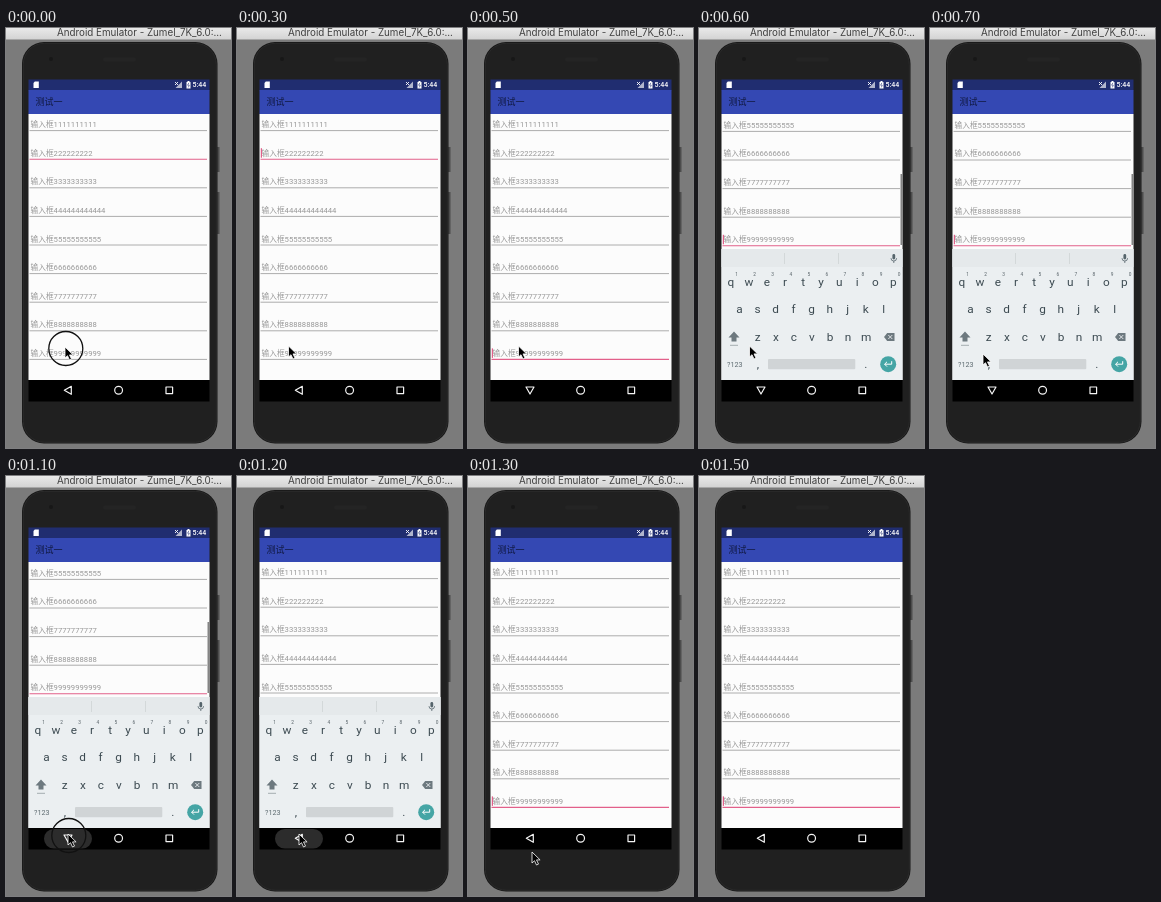
These frames come from a looping animation (225x420 px, 1600 ms). An HTML page:

```html
<!DOCTYPE html>
<html lang="zh">
<head>
<meta charset="utf-8">
<style>
  html, body { margin: 0; width: 100%; height: 100%; overflow: hidden; background: #7b7b7b; }
  svg { display: block; width: 100vw; height: 100vh; font-family: Roboto, "Noto Sans CJK SC", "Noto Sans CJK", sans-serif; }
  .title { font: 9.8px Inter, sans-serif; fill: #404040; }
  .hint { font-size: 7.7px; fill: #989898; }
  .key { font-size: 11.8px; fill: #3c4a51; text-anchor: middle; }
  .small { font-size: 4.8px; fill: #566167; text-anchor: middle; }
  .nav { fill: none; stroke: #f4f4f4; stroke-width: 1.2; stroke-linejoin: round; }
</style>
</head>
<body>
<svg viewBox="0 0 225 420" preserveAspectRatio="none">
  <defs>
    <linearGradient id="bar" x2="0" y2="1">
      <stop stop-color="#e9e9e9"/><stop offset="1" stop-color="#d3d3d3"/>
    </linearGradient>
    <clipPath id="screen"><rect x="22.5" y="51.5" width="181" height="322"/></clipPath>
    <clipPath id="page"><rect x="22" y="86" width="182" height="266"/></clipPath>
  </defs>

  <rect width="225" height="420" fill="#7b7b7b"/>
  <rect width="225" height="11.5" fill="url(#bar)"/>
  <text class="title" x="51" y="8.3">Android Emulator - Zumel_7K_6.0:...</text>

  <path d="M211 119h2.5v25h-2.5zM211 164h2.5v42h-2.5z" fill="#4c4c4c"/>
  <rect x="16" y="14" width="195.5" height="401.5" rx="22" fill="#171717"/>
  <rect x="17.3" y="15.3" width="193" height="399" rx="21" fill="#202020" stroke="#2f2f2f" stroke-width=".8"/>
  <circle cx="45" cy="31" r="2" fill="#171717"/>
  <rect x="97" y="29.5" width="33" height="4" rx="2" fill="#242424"/>

  <g clip-path="url(#screen)">
    <rect x="22" y="51" width="182" height="11.5" fill="#202d70"/>
    <path d="M28.8 53.5h4v6.5h-5.3v-5z" fill="#fff"/>
    <path d="M176 53.5v6.5h-6.5z" fill="#fff" opacity=".65"/>
    <path d="M169 54l3 3m0-3l-3 3" stroke="#fff" stroke-width=".9"/>
    <path d="M180.5 54h1v-1h2v1h1v6.5h-4z" fill="#fff"/>
    <path d="M182.9 54.8l-1.3 2.4h1.7l-1 2.2" fill="none" stroke="#202d70" stroke-width=".6"/>
    <text x="186.5" y="59.4" font-size="7" font-weight="500" fill="#fff">5:44</text>

    <rect x="22" y="62" width="182" height="24" fill="#3448b3"/>
    <text x="29.5" y="76.6" font-size="9" fill="#10183f">测试一</text>
    <rect x="22" y="86" width="182" height="266" fill="#fcfcfc"/>
    <g clip-path="url(#page)">
      <g id="form"></g>
      <rect id="scrollbar" x="201.5" y="146" width="2" height="71" fill="#858585"/>
    </g>

    <g id="keyboard">
      <rect x="22" y="221" width="182" height="131" fill="#ebeff1"/>
      <rect x="22" y="221" width="182" height="18" fill="#e5e9eb"/>
      <path d="M85.5 225v11M139.5 225v11" stroke="#ced3d5" stroke-width=".8"/>
      <rect x="193.4" y="226" width="2.8" height="5.5" rx="1.4" fill="#55646b"/>
      <path d="M192 230.2a2.8 2.8 0 0 0 5.6 0M194.8 233v2" fill="none" stroke="#55646b" stroke-width=".8"/>
      <g id="keys"></g>
      <path d="M35 303.5l5.5 6h-3v4h-5v-4h-3z" fill="#6d797f"/>
      <path d="M31 317.3h8" stroke="#a4adb1"/>
      <path d="M185 309l3.2-4h7.3v8h-7.3z" fill="#6d797f"/>
      <path d="M189.3 307l4 4m0-4l-4 4" stroke="#ebeff1" stroke-width=".9"/>
      <text x="28" y="338.8" font-size="7.2" fill="#5f6c72">?123</text>
      <rect x="69" y="331" width="87.3" height="10.2" rx="1" fill="#d0d4d6"/>
      <circle cx="189.2" cy="336.2" r="8" fill="#45a5a5"/>
      <path d="M192.7 333.2v3h-7m2.3-2.4l-2.4 2.4 2.4 2.4" fill="none" stroke="#fff"/>
    </g>

    <rect x="22" y="352" width="182" height="22" fill="#000"/>
    <rect id="ripple" x="38" y="353" width="48" height="19.5" rx="9.75" fill="#2c2c2c"/>
    <path id="back" class="nav"/>
    <circle class="nav" cx="112.6" cy="362.3" r="3.9"/>
    <rect class="nav" x="160" y="359" width="6.6" height="6.6"/>
  </g>

  <g id="pointer">
    <circle id="click" cx=".8" cy="1.5" r="17" fill="none" stroke="#111" stroke-width="1.3"/>
    <path d="M0 0v11l2.5-2.3 2 4.3 2-.9-2-4.2h3.6z" fill="#000" stroke="#fff" stroke-width=".8"/>
  </g>
</svg>
<script>
  const PITCH = 28.6, LOOP = 1600, STEP = 100, PINK = '#e2608a';
  const $ = id => document.getElementById(id);
  const show = (id, on) => $(id).setAttribute('visibility', on ? 'visible' : 'hidden');
  const add = (parent, tag, attrs, text = '') => {
    const el = document.createElementNS('http://www.w3.org/2000/svg', tag);
    for (const name in attrs) el.setAttribute(name, attrs[name]);
    el.textContent = text;
    return parent.appendChild(el);
  };

  const counts = [10, 9, 10, 12, 11, 10, 10, 10, 11];
  const lines = counts.map((count, i) => {
    const y = 99.1 + PITCH * i;
    add($('form'), 'text', { class: 'hint', x: 24.5, y }, '输入框' + String(i + 1).repeat(count));
    return add($('form'), 'path', { d: `M23.5 ${y + 3.5}H201` });
  });
  add($('form'), 'rect', { id: 'caret', x: 23.8, width: 1.2, height: 9.5, fill: PINK });

  const row = (letters, x, y, type = 'key') => [...letters].forEach((letter, i) =>
    add($('keys'), 'text', { class: type, x: x + 18.05 * i, y }, letter));
  row('qwertyuiop', 31.9, 257.5);
  row('asdfghjkl', 40.4, 285);
  row('zxcvbnm', 58.8, 312.5);
  row(',', 58.8, 339.5);
  row('.', 166.8, 339.5);
  row('1234567890', 37.6, 247.5, 'small');

  // Pointer tip at each step; it leaves through the bottom edge.
  const path = [[59, 319], [56, 319], [53, 319], [51.5, 318], [51, 318], [50.5, 318], [50.5, 318], [53, 326],
    [59, 347], [62, 357], [62, 358], [62, 358], [62, 358], [64, 376], [70, 407]];

  function draw(now) {
    const step = Math.floor(now % LOOP / STEP);
    const between = (a, b) => step >= a && step < b;
    const focus = step < 5 ? 1 : 8;
    const scrolled = between(6, 12);

    $('form').setAttribute('transform', `translate(0 ${scrolled ? -113.6 : 0})`);
    lines.forEach((line, i) => {
      line.setAttribute('stroke', i === focus ? PINK : '#989898');
      line.setAttribute('stroke-width', i === focus ? 1.1 : .8);
    });
    $('caret').setAttribute('y', 91.6 + PITCH * focus);
    show('caret', between(2, 8) || step >= 13);
    show('scrollbar', scrolled);
    show('keyboard', between(6, 13));
    show('ripple', between(11, 13));
    $('back').setAttribute('d', between(5, 12) ? 'M58 359h8l-4 7z' : 'M58.3 362.3l7-4v8z');

    const tip = path[step];
    show('pointer', tip);
    if (tip) $('pointer').setAttribute('transform', `translate(${tip})`);
    show('click', step === 0 || step === 4 || between(10, 12));
    requestAnimationFrame(() => draw(performance.now()));
  }
  draw(0);
</script>
</body>
</html>
```
